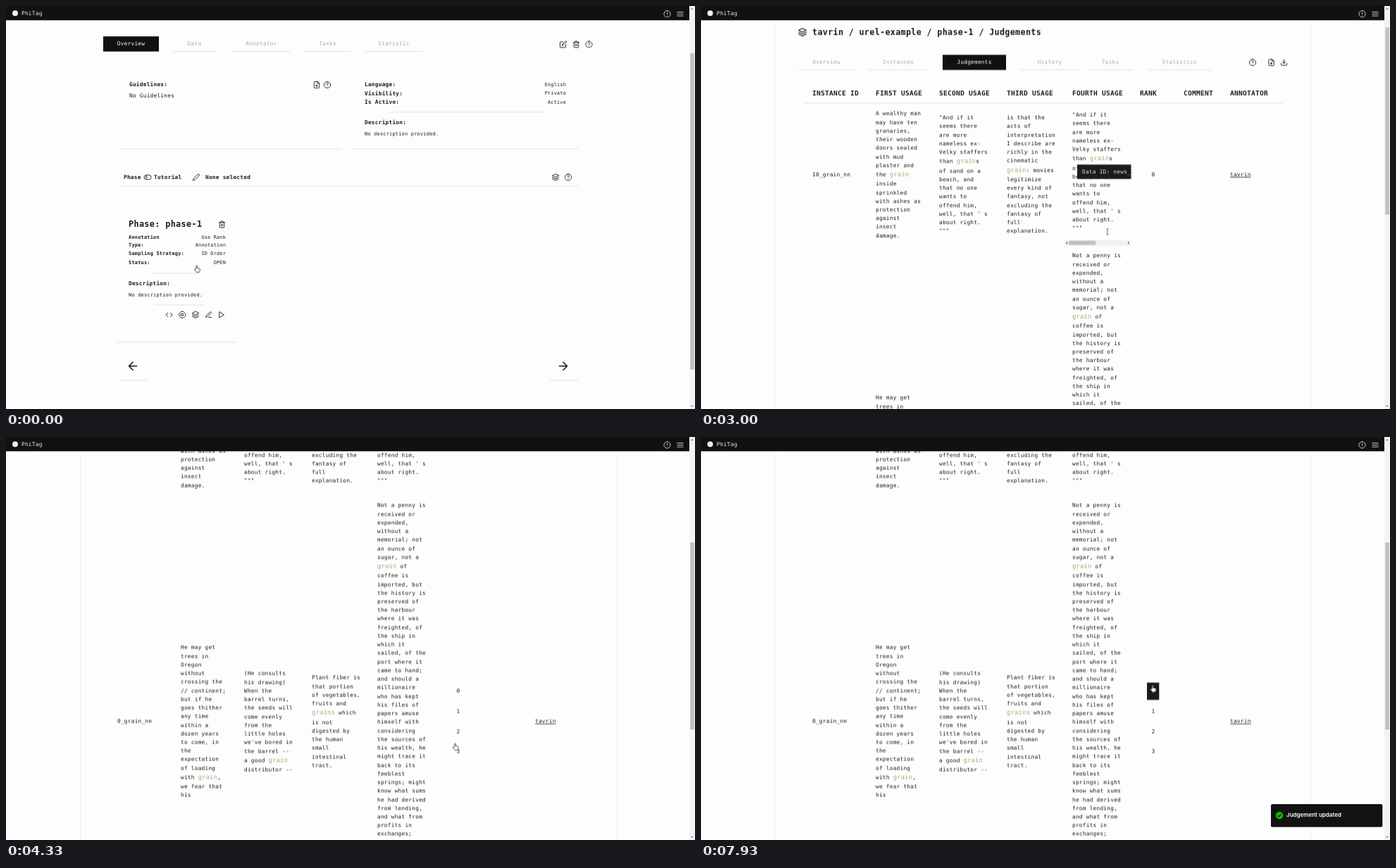
An HTML page that plays this animation: 978 by 573 pixels, repeating every 8000 ms.

```html
<!DOCTYPE html>
<html lang="en">
<head>
<meta charset="utf-8">
<title>Judgements</title>
<style>
html, body { margin: 0; width: 100%; height: 100%; overflow: hidden; background: #fdfdfd; }
svg { display: block; width: 978px; height: 573px; }
text { font-family: "DejaVu Sans Mono", "Noto Sans Mono", monospace; letter-spacing: .03em; white-space: pre; fill: #1c1c1c; }
.icon { fill: none; stroke: #1c1c1c; stroke-width: 2; stroke-linecap: round; stroke-linejoin: round; }
.hit { fill: #a3ad72; font-size: 8.8px; }

#project, #phase, #table, #tip1, #tip2, #load0, #load, #cell4, #row2, #ring, #hand, #beam, #arrow
  { animation: 8s step-end infinite; }
#project { animation-name: project; }
#phase { animation-name: phase; }
#table { animation-name: table; }
#tip1 { animation-name: tip1; }
#tip2 { animation-name: tip2; }
#cell4 { animation-name: cell4; }
#row2 { animation-name: row2; }
#load0, #load { animation-name: load; }
#ring { animation-name: ring; }
#hand { animation-name: hand; }
#beam { animation-name: beam; }
#arrow { animation-name: arrow; }
#hover text { animation: hover 8s step-end infinite; }
.late { animation: late 8s step-end infinite; }
#scroll { animation: scroll 8s linear infinite; }
#thumb { animation: thumb 8s linear infinite; }
#d1 { animation: d1 8s linear infinite; }
#d2 { animation: d2 8s linear infinite; }
#d3 { animation: d3 8s linear infinite; }
#mark { animation: mark 8s linear infinite; mix-blend-mode: difference; }
#cursor { animation: cursor 8s ease-in-out infinite; }
#toast { animation: toast 8s ease-out infinite; }
#toast text { font-family: Inter, sans-serif; letter-spacing: 0; fill: #fff; }
#check { animation: check 8s ease-out infinite; transform-origin: 821px 538px; }

@keyframes project { 0% { opacity: 1 } 5%, 100% { opacity: 0 } }
@keyframes phase { 0% { opacity: 0 } 5% { opacity: 1 } 26.2%, 100% { opacity: 0 } }
@keyframes table { 0% { opacity: 0 } 26.2%, 100% { opacity: 1 } }
@keyframes hover { 0% { fill: #aaa } 21.2%, 100% { fill: #1c1c1c } }
@keyframes tip1 { 0% { opacity: 0 } 35% { opacity: 1 } 43.5%, 100% { opacity: 0 } }
@keyframes tip2 { 0% { opacity: 0 } 43.5% { opacity: 1 } 48.4%, 100% { opacity: 0 } }
@keyframes cell4 { 0% { transform: none } 35% { transform: translateY(-4px) } 43.5%, 100% { transform: none } }
@keyframes row2 { 0% { transform: none } 43.5% { transform: translateY(4px) } 48.4%, 100% { transform: none } }
@keyframes load { 0% { opacity: 0 } 28.4%, 100% { opacity: 1 } }
@keyframes late { 0% { transform: none } 28.4%, 100% { transform: translateX(14px) } }
@keyframes ring {
  0% { opacity: 0 } .8% { opacity: 1 } 4.5% { opacity: 0 } 25.75% { opacity: 1 } 28% { opacity: 0 }
  57.75% { opacity: 1 } 66.5% { opacity: 0 } 95.75% { opacity: 1 } 98.2%, 100% { opacity: 0 }
}
@keyframes hand {
  0% { opacity: 1 } 5% { opacity: 0 } 21.2% { opacity: 1 } 28.4% { opacity: 0 } 54%, 100% { opacity: 1 }
}
@keyframes beam { 0% { opacity: 0 } 28.4% { opacity: 1 } 54%, 100% { opacity: 0 } }
@keyframes arrow { 0% { opacity: 0 } 5% { opacity: 1 } 21.2%, 100% { opacity: 0 } }
@keyframes scroll {
  0%, 36.6% { transform: none } 38.75% { transform: translateY(-115px) }
  40.6%, 41.6% { transform: translateY(-233.5px) } 43.5%, 100% { transform: translateY(-306.5px) }
}
@keyframes thumb {
  0%, 36.6% { transform: none } 38.75% { transform: translateY(53px) }
  40.6%, 41.6% { transform: translateY(108px) } 43.5%, 100% { transform: translateY(142px) }
}
@keyframes d1 {
  0%, 61.25% { transform: none } 64.1% { transform: translateY(23px) }
  65%, 69.99% { transform: translateY(28.5px) } 70%, 100% { transform: none }
}
@keyframes d2 {
  0%, 59% { transform: none } 61.5%, 69.99% { transform: translateY(28.5px) } 70%, 100% { transform: none }
}
@keyframes d3 {
  0%, 58.3% { transform: none } 64.1% { transform: translate(-1.5px, -54.5px) }
  65%, 69.99% { transform: translateY(-57.5px) } 70%, 100% { transform: none }
}
@keyframes mark {
  0%, 55.59% { transform: none; opacity: 0 } 55.6%, 58.3% { transform: none; opacity: 1 }
  64.1% { transform: translate(-1.5px, -54.5px) } 65%, 79.49% { transform: translateY(-57.5px) }
  79.5%, 86.99% { transform: translateY(-29px) } 87%, 90.49% { transform: translateY(-57.5px) }
  90.5% { transform: translateY(-86px) } 98.2% { opacity: 1 } 98.6%, 100% { transform: translateY(-86px); opacity: .9 }
}
@keyframes cursor {
  0%, 11.6% { transform: translate(271px, 372px) } 21.3%, 27.5% { transform: translate(370px, 245px) }
  35%, 47.5% { transform: translate(577px, 321px) } 55.6%, 58.3% { transform: translate(642px, 447px) }
  64.1%, 70% { transform: translate(643px, 390.5px) } 79.5%, 85% { transform: translate(642.5px, 418.5px) }
  93.8%, 100% { transform: translate(641.5px, 356px) }
}
@keyframes toast {
  0%, 69.5% { transform: translateX(180px) } 74% { transform: translateX(-15px) }
  76% { transform: translateX(6px) } 77.5% { transform: translateX(-3px) } 78.8%, 100% { transform: none }
}
@keyframes check { 0%, 75% { transform: scale(0) } 79.5%, 100% { transform: none } }
</style>
</head>
<body>
<svg id="stage" width="978" height="573"></svg>
<script>
const user = 'tavrin';
const circle = 'M12 2a10 10 0 1 0 .01 0z';
const icons = {
  edit: 'M11 4H4a2 2 0 0 0-2 2v14a2 2 0 0 0 2 2h14a2 2 0 0 0 2-2v-7M18.5 2.5a2.1 2.1 0 0 1 3 3L12 15l-4 1 1-4z',
  trash: 'M3 6h18M19 6v14a2 2 0 0 1-2 2H7a2 2 0 0 1-2-2V6m3 0V4a2 2 0 0 1 2-2h4a2 2 0 0 1 2 2v2M10 11v6M14 11v6',
  help: circle + 'M9.1 9a3 3 0 0 1 5.8 1c0 2-3 3-3 3M12 17h.01',
  file: 'M14 2H6a2 2 0 0 0-2 2v16a2 2 0 0 0 2 2h12a2 2 0 0 0 2-2V8zM14 2v6h6M12 18v-6M9 15h6',
  layers: 'M12 2 2 7l10 5 10-5zM2 17l10 5 10-5M2 12l10 5 10-5',
  pen: 'M17 3a2.8 2.8 0 1 1 4 4L7.5 20.5 2 22l1.5-5.5z',
  write: 'M12 20h9M16.5 3.5a2.1 2.1 0 0 1 3 3L7 19l-4 1 1-4z',
  play: 'M5 3l14 9-14 9z',
  code: 'M16 18l6-6-6-6M8 6l-6 6 6 6',
  stop: circle + 'M9 9h6v6H9z',
  toggle: 'M8 5h8a7 7 0 0 1 0 14H8a7 7 0 0 1 0-14zM8 9a3 3 0 1 0 .01 0z',
  left: 'M19 12H5M12 19l-7-7 7-7',
  right: 'M5 12h14M12 5l7 7-7 7',
  alert: circle + 'M12 8v4M12 16h.01',
  menu: 'M3 12h18M3 6h18M3 18h18',
  download: 'M21 15v4a2 2 0 0 1-2 2H5a2 2 0 0 1-2-2v-4M7 10l5 5 5-5M12 15V3',
  tool: 'M14.7 6.3a1 1 0 0 0 0 1.4l1.6 1.6a1 1 0 0 0 1.4 0l3.8-3.8a6 6 0 0 1-7.9 7.9l-6.9 6.9a2.1 2.1 0 0 1-3-3l6.9-6.9a6 6 0 0 1 7.9-7.9z'
};

// y is the optical middle of a line; {word} is highlighted
const text = (x, y, s, { size = 7.8, weight = 400, anchor = 'start', style = '' } = {}) =>
  `<text x="${x}" y="${y + size * .3}" font-size="${size}" font-weight="${weight}" text-anchor="${anchor}" style="${style}">` +
  s.replace(/{(.*?)}/g, '<tspan class="hit">$1</tspan>') + '</text>';
const bold = (x, y, s, size = 7.8) => text(x, y, s, { size, weight: 700 });
const small = (x, y, s, weight = 400) => text(x, y, s, { size: 6.95, weight });
const end = (x, y, s) => text(x, y, s, { size: 6.85, anchor: 'end' });
const rect = (x, y, w, h, fill, extra = '') => `<rect x="${x}" y="${y}" width="${w}" height="${h}" fill="${fill}" ${extra}/>`;
const rule = (x1, x2, y, color = '#e2e2e2', w = 1) => rect(x1, y - w / 2, x2 - x1, w, color);
const shade = (x1, x2, y) => rule(x1, x2, y, '#e8e8e8', 1.2) + rule(x1 + 1, x2 - 1, y + 1.2, '#f5f5f5', 1.2);
const icon = (name, x, y, size = 11, extra = '') =>
  `<path class="icon" d="${icons[name]}" transform="translate(${x - size / 2} ${y - size / 2}) scale(${size / 24})" style="${extra}"/>`;
const group = (id, ...parts) => `<g id="${id}">${parts.join('')}</g>`;

const tabs = (y, list, active) => list.map(([name, x1, x2]) => {
  const label = style => text((x1 + x2) / 2, y, name, { anchor: 'middle', style });
  if (name === active) return rect(x1, y - 10.3, x2 - x1, 21.5, '#111') + label('fill:#fff');
  return (name === 'Judgements' ? group('hover', label('')) : label('fill:#aaa')) + shade(x1, x2, y + 10.7);
}).join('');

const column = (x, y, lines) => {
  let tall = false;
  return lines.split('|').map((line, i) => {
    const hit = line.includes('{');
    if (i) y += 12.24 + (hit || tall ? 1 : 0);
    tall = hit;
    return text(x, y, line);
  }).join('');
};

const scrollbar = thumb => rect(970, 0, 8, 573, '#f3f3f3') + thumb +
  '<path d="M972 5l2-2 2 2zM972 568l2 2 2-2z" fill="#777"/>';
const thumb = (y, h, id = '') => rect(971.3, y, 5.6, h, '#c1c1c1', id && `id="${id}"`);

const guidelines = bold(175, 112, 'Guidelines:') + icon('file', 441, 112) + icon('help', 456, 112) +
  text(175, 128, 'No Guidelines') + shade(160, 477, 203);
const facts = rows => rows.map(([k, v], i) => bold(509, 112 + i * 12.3, k) + end(795, 112 + i * 12.3, v)).join('') +
  rule(542, 763, 151) + bold(509, 166, 'Description:') +
  small(509, 181.5, 'No description provided.') + shade(492, 813, 203);

const project = group('project',
  scrollbar(thumb(67, 450)),
  tabs(53.5, [['Overview', 138, 217], ['Data', 237, 298], ['Annotator', 321, 404], ['Tasks', 423, 490], ['Statistic', 509, 592]], 'Overview'),
  icon('edit', 791, 54.5), icon('trash', 809.5, 54.5), icon('help', 827.5, 54.5),
  guidelines,
  facts([['Language:', 'English'], ['Visibility:', 'Private'], ['Is Active:', 'Active']]),
  bold(167, 243.5, 'Phase'), icon('toggle', 201, 243.5), bold(210, 243.5, 'Tutorial'),
  icon('pen', 270, 243.5), bold(283, 243.5, 'None selected'),
  icon('layers', 780, 243.5), icon('help', 798, 243.5), shade(160, 813, 256),
  bold(174, 310, 'Phase: phase-1', 11.8), icon('trash', 306.5, 310.5),
  small(174, 328.5, 'Annotation', 700), end(312, 328.5, 'Use Rank'),
  small(174, 339.5, 'Type:', 700), end(312, 339.5, 'Annotation'),
  small(174, 351.5, 'Sampling Strategy:', 700), end(312, 351.5, 'ID Order'),
  small(174, 364.5, 'Status:', 700), end(312, 364.5, 'OPEN'), rule(205, 275, 380),
  bold(174, 395, 'Description:'), small(174, 411, 'No description provided.'), rule(210, 280, 425),
  ['code', 'stop', 'layers', 'write', 'play'].map((n, i) => icon(n, 231.5 + i * 18.7, 439)).join(''),
  shade(157, 329, 478),
  icon('left', 180, 512, 19), shade(160, 200, 532), icon('right', 791, 512, 19), shade(772, 812, 532));

const heading = tail => icon('layers', 144, 86, 13) + bold(158, 86, `${user} / urel-example / phase-1${tail}`, 11.7);
const phaseTabs = active => tabs(128.5, [['Overview', 138, 218], ['Instances', 238, 322], ['Judgements', 343, 433],
  ['History', 453, 537], ['Tasks', 548, 614], ['Statistics', 634, 724]], active);

const phase = group('phase',
  scrollbar(''),
  `<g transform="translate(0 121)">${heading('')}${phaseTabs('Overview')}${icon('help', 828, 129)}</g>`,
  `<g transform="translate(0 196)">${guidelines}${facts([['Annotation Type:', 'Use Rank Annotation'], ['Sampling Strategy:', 'ID Order'], ['Status:', 'OPEN']])}</g>`);

const nameless = '"And if it|seems there|are more|nameless ex-|Velky staffers|than {grain}s|of sand on a|beach, and|that no one|wants to|offend him,|well, that \' s|about right.|"""';
const title = (x, s) => bold(x, 173.5, s, 9.5);
const tip = (id, y, s, ...extra) => group(id, ...extra,
  `<g clip-path="url(#cell)">${rect(534, y - 10.2, 90, 20.4, '#1c1c1c')}${text(541, y, s, { style: 'fill:#e4e4e4' })}</g>`);
const late = s => `<g class="late">${s}</g>`;
const name = y => text(737, y, user, { style: 'text-decoration:underline' });
const digit = (n, y) => group('d' + n, text(642, y, String(n), { anchor: 'middle' }));
const hbar = rect(516, 381.5, 94.5, 8, '#f1f1f1') + rect(522, 382.5, 38, 6, '#c1c1c1') +
  '<path d="M520 383.5l-2 2 2 2zM606 383.5l2 2-2 2z" fill="#555"/>';

const rows = [
  rect(105, 51, 1, 1100, '#f1f1f1'), rect(865.5, 51, 1, 1100, '#f1f1f1'),
  heading(' / Judgements'), phaseTabs('Judgements'),
  icon('help', 783, 129), icon('file', 809.5, 129), icon('download', 827.5, 129),
  title(158, 'INSTANCE ID'), title(248, 'FIRST USAGE'), title(338, 'SECOND USAGE'),
  title(434, 'THIRD USAGE'), title(527, 'FOURTH USAGE'), title(623, 'RANK'),
  rule(147, 825, 187),
  `<g clip-path="url(#sheet)">${late(title(671, 'COMMENT') + title(737, 'ANNOTATOR') + title(815.5, 'EDIT') +
    name(288.5) + icon('tool', 820.5, 288.5))}</g>`,
  text(158, 288.5, '10_grain_nn'),
  column(248, 202, 'A wealthy man|may have ten|granaries,|their wooden|doors sealed|with mud|plaster and|the {grain}|inside|sprinkled|with ashes as|protection|against|insect|damage.'),
  column(338, 207.8, nameless),
  column(434, 207.8, 'is that the|acts of|interpretation|I describe are|richly in the|cinematic|{grain}: movies|legitimize|every kind of|fantasy, not|excluding the|fantasy of|full|explanation.'),
  group('cell4', column(527, 207.8, nameless)),
  group('load0', text(642, 288.5, '0', { anchor: 'middle' })),
  column(527, 404, 'Not a penny is|received or|expended,|without a|memorial; not|an ounce of|sugar, not a|{grain} of|coffee is|imported, but|the history is|preserved of|the harbour|where it was|freighted, of|the ship in|which it|sailed, of the|port where it|came to hand;|and should a|millionaire|who has kept|his files of|papers amuse|himself with|considering|the sources of|his wealth, he|might trace it|back to its|feeblest|springs; might|know what sums|he had derived|from lending,|and what from|profits in|exchanges;'),
  group('row2',
    text(158, 711, '0_grain_nn'),
    column(248, 606, 'He may get|trees in|Oregon|without|crossing the|// continent;|but if he|goes thither|any time|within a|dozen years|to come, in|the|expectation|of loading|with {grain},|we fear that|his'),
    column(338, 643, '(He consults|his drawing)|When the|barrel turns,|the seeds will|come evenly|from the|little holes|we\'ve bored in|the barrel --|a good {grain}|distributor --'),
    column(434, 649, 'Plant fiber is|that portion|of vegetables,|fruits and|{grains} which|is not|digested by|the human|small|intestinal|tract.'),
    late(name(711)),
    group('load',
      rect(620, 640, 42, 140, '#fdfdfd'),
      digit(0, 668), digit(1, 696.5), digit(2, 725.5), digit(3, 754),
      rect(633, 741.7, 17.3, 24.6, '#fff', 'id="mark"'))),
  tip('tip1', 284.5, 'Data ID: news_1', hbar),
  tip('tip2', 711, 'Data ID: mag_18')
];

const table = group('table', group('scroll', ...rows), scrollbar(thumb(8, 266, 'thumb')));

const header = rect(0, 0, 970, 20.3, '#111') + '<circle cx="13" cy="10.3" r="4" fill="#eee"/>' +
  text(22, 10.5, 'PhiTag', { style: 'fill:#eee' }) +
  icon('alert', 938.5, 11.3, 11, 'stroke:#ddd') + icon('menu', 957, 11.3, 11, 'stroke:#ddd');

const toast = group('toast',
  rect(808.5, 522.5, 159, 33, '#ececec', 'rx="3"'), rect(809, 522, 158.3, 32.5, '#121212', 'rx="2"'),
  group('check', '<circle cx="821" cy="538" r="5.2" fill="#07bc0c"/><path d="M818.5 538.2l1.8 1.8 3.3-3.7" fill="none" stroke="#121212" stroke-width="1.2"/>'),
  text(831, 538, 'Judgement updated', { size: 8, weight: 600 }));

const cursor = group('cursor',
  '<circle id="ring" r="16.3" fill="none" stroke="#df6169" stroke-width="2"/>',
  '<path id="hand" d="M-1.2 2V-2a.9.9 0 0 1 1.8 0V.6l2.6.6c1 .2 1.4.8 1.2 1.8l-.5 2.2c-.2 1-.8 1.4-1.6 1.4H.2c-.7 0-1.2-.3-1.6-.9L-3.2 3.2c-.5-.8.3-1.7 1.2-1z" fill="#fff" stroke="#222" stroke-width=".8"/>',
  '<path id="beam" d="M-1.5-4h3M0-4v8M-1.5 4h3" fill="none" stroke="#444" stroke-width=".8"/>',
  '<path id="arrow" d="M0 0v9l2.2-2 1.4 3 1.2-.6-1.4-2.9h3z" fill="#fff" stroke="#222" stroke-width=".8"/>');

document.getElementById('stage').innerHTML =
  `<defs><clipPath id="cell">${rect(0, 0, 610.5, 1200, '#000')}</clipPath><clipPath id="sheet">${rect(0, 0, 825, 1200, '#000')}</clipPath></defs>` +
  rect(0, 0, 978, 573, '#fdfdfd') + project + phase + table + header + toast + cursor;
</script>
</body>
</html>
```
